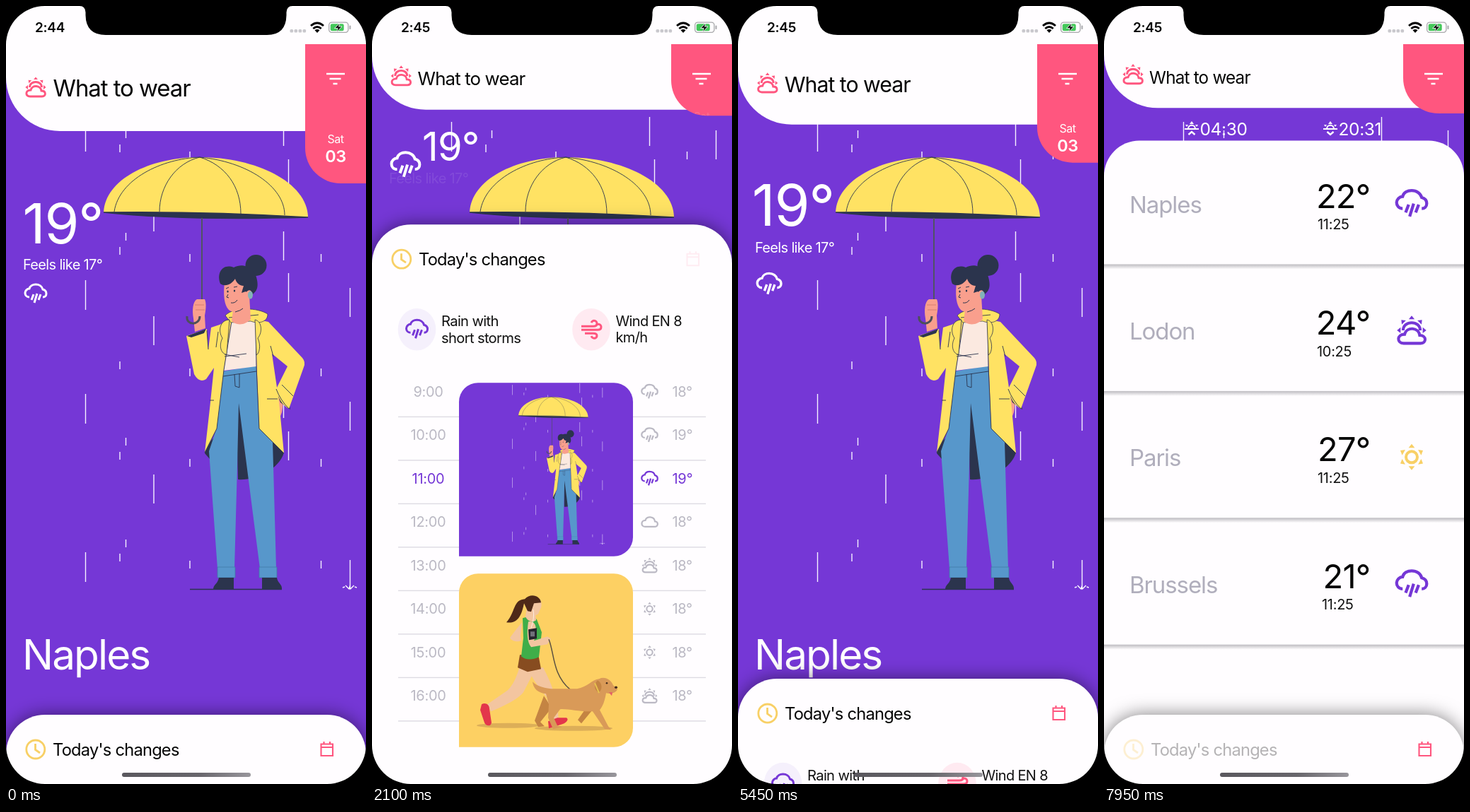
Write an HTML page with a canvas that moves like this. It is 509x1101 px and loops after 8 s.

```html
<!DOCTYPE html>
<html lang="en">
<head>
<meta charset="utf-8">
<title>What to wear</title>
<style>
html, body { margin: 0; width: 100%; height: 100%; overflow: hidden; background: #000; }
canvas { display: block; width: 509px; height: 1101px; }
</style>
</head>
<body>
<canvas id="stage" width="509" height="1101"></canvas>
<script>
const W = 509, H = 1101, LOOP = 8000;
const WHITE = '#fffdff', PURPLE = '#7537d6', PINK = '#ff567f', NAVY = '#2b344d',
  YELLOW = '#ffe263', GOLD = '#fdd063', JEANS = '#5797cb', SKIN = '#f99f8d', GREY = '#bbb9c4';
const ctx = document.getElementById('stage').getContext('2d');

// ---------- helpers ----------
const clamp = v => Math.max(0, Math.min(1, v));
const mix = (a, b, k) => a + (b - a) * k;
const ramp = (t, from, length) => clamp((t - from) / length);

// critically damped, settling fully at the end
function spring(t, start, speed) {
  const x = Math.max(0, t - start) / 1000 * speed;
  return Math.min(1, 1.003 * (1 - (1 + x) * Math.exp(-x)));
}
function bounce(t, start) {
  const s = Math.max(0, t - start) / 1000;
  return 1 - Math.exp(-9.4 * s) * (Math.cos(10.5 * s) + 0.9 * Math.sin(10.5 * s));
}
const openClose = (t, open, openSpeed, close, closeSpeed) =>
  t < 5100 ? spring(t, open, openSpeed) : 1 - spring(t, close, closeSpeed);

const paths = new Map();
function shape(d, fill, stroke, width = 1) {
  if (!paths.has(d)) paths.set(d, new Path2D(d));
  const p = paths.get(d);
  if (fill) { ctx.fillStyle = fill; ctx.fill(p); }
  if (stroke) { ctx.strokeStyle = stroke; ctx.lineWidth = width; ctx.stroke(p); }
}
function box(x, y, w, h, r, fill) {
  ctx.beginPath();
  ctx.roundRect(x, y, w, h, r);
  ctx.fillStyle = fill;
  ctx.fill();
}
function oval(x, y, rx, ry, fill) {
  ctx.beginPath();
  ctx.ellipse(x, y, rx, ry, 0, 0, 7);
  ctx.fillStyle = fill;
  ctx.fill();
}
// cy is the middle of the capitals; figures are set a little looser than words
function text(str, x, cy, size, color, weight = 400, align = 'left') {
  const tracking = /^[\d:°]+$/.test(str) ? -0.015 : -0.033;
  ctx.font = `${weight} ${size}px Inter, Roboto, sans-serif`;
  ctx.letterSpacing = `${tracking * size}px`;
  ctx.textAlign = align;
  ctx.fillStyle = color;
  ctx.fillText(str, x, cy + 0.364 * size);
}
function group(fn, x = 0, y = 0, scale = 1, alpha = 1) {
  ctx.save();
  ctx.translate(x, y);
  ctx.scale(scale, scale);
  ctx.globalAlpha *= alpha;
  fn();
  ctx.restore();
}

// ---------- icons ----------
function rays(count, from, step, radius, size, color) {
  for (let i = 0; i < count; i++) {
    ctx.save();
    ctx.rotate(from + i * step);
    ctx.translate(radius, 0);
    ctx.scale(size, size);
    shape('M0-4L5 0L0 4Z', color);
    ctx.restore();
  }
}
const icons = {
  rain(c) {
    shape('M-9 5C-13 5-15 2-15-1C-15-4-12-7-9-7C-8-11-4-13 0-13C5-13 9-10 10-6C14-5 15-2 15 0C15 3 13 5 10 5', null, c, 3);
    shape('M-3 1L-6 9M2 0L-2 13M7 1L4 9', null, c, 3);
  },
  cloud(c) {
    shape('M-8 9H9C17 9 17-1 10-1C9-11-6-12-8-3C-17-3-17 9-8 9Z', null, c, 3);
  },
  partly(c) {
    shape('M-8 13H9C15 13 15 5 8 5C7-3-5-4-7 4C-15 4-15 13-8 13ZM-8.5 0C-8.5-10 8.5-10 8.5 0', null, c, 2.9);
    rays(5, -Math.PI, Math.PI / 4, 11, 0.72, c);
  },
  sun(c) {
    shape('M-8 0A8 8 0 1 1 8 0A8 8 0 1 1-8 0', null, c, 4);
    rays(6, -Math.PI / 2, Math.PI / 3, 13, 1.1, c);
  },
  wind(c) {
    shape('M-14-4H3C10-4 9-12 4-12C2-12 1-11 0-9M-14 1H9C16 1 15-7 10-7C8-7 8-6 7-5M-9 6H3C10 6 9 13 4 13C2 13 1 12 0 10', null, c, 3);
  },
  horizon(c) {
    shape('M-10 0H10M-5 0C-5-7 5-7 5 0', null, c, 2);
    shape('M-3-7L0-11L3-7ZM-9-6L-5-6L-7-3ZM9-6L5-6L7-3Z', c);
  },
  sunrise(c) {
    icons.horizon(c);
    shape('M-4.5 8L0 4L4.5 8', null, c, 2.4);
  },
  sunset(c) {
    icons.horizon(c);
    shape('M-4.5 4L0 8L4.5 4', null, c, 2.4);
  }
};
const icon = (name, x, y, scale, color) => group(() => icons[name](color), x, y, scale);

// ---------- rainy scene ----------
function rain() {
  const drops = (x, length, ...tops) => tops.forEach(y => {
    ctx.fillStyle = '#f6f1ff';
    ctx.fillRect(x - 0.7, y, 1.4, length);
  });
  drops(112.5, 42, 164, 388, 549, 773);
  drops(209, 41, 278, 439, 663);
  drops(392.5, 41, 157, 319, 542);
  drops(399.5, 41, 217, 378, 602);
  drops(486.5, 41, 176, 399, 560, 784);
  drops(169.5, 11, 176, 321, 611, 755);
  drops(161, 11, 196, 341, 503, 631, 775);
  drops(260, 11, 206, 351, 513, 641, 785);
  drops(445.5, 11, 206, 351, 513, 641, 785);
  shape('M480 820L485 825L486 822L487 825L492 820M476 823L479 822M493 822L496 823', null, '#fff', 1.4);
}

function umbrella() {
  shape('M138 292C140 246 202 214 274 214C353 214 426 249 427 299Z', YELLOW);
  shape('M138 292Q280 290 427 299Q250 304 138 292Z', NAVY, NAVY, 1.5);
  shape('M274 214C220 216 160 245 153 291M274 214C240 222 217 255 217 291M274 214C310 225 332 255 332 294M274 214C340 220 394 255 394 296', null, NAVY, 0.9);
  shape('M277 300V439', null, '#505364', 2);
}

function legs() {
  shape('M325 555L328 670C352 672 386 656 393 632L358 590ZM283 622L281 633L288 641L295 610Z', NAVY);
  shape('M307 517L354 509L358 598L377 616L382 796H359L329 562L327 650L323 796H299L287 630L298 597Z', JEANS);
  shape('M299 794H324V809H299ZM358 794H383V809H358Z', JEANS, '#3f79a8', 0.8);
  shape('M307 524L354 517M323 521L324 538L330 540L330 520', null, NAVY, 0.9);
  shape('M301 809H322V826H293C293 818 299 819 301 809ZM362 809H383C384 817 391 818 390 826H362Z', NAVY);
  shape('M260 825.5H390', null, NAVY, 1.6);
}

function coat() {
  shape('M319 444H353L354 510L308 516Z', '#fbe9e0');
  shape('M382 542C390 543 394 556 390 575L385 588C383 578 385 562 381 552Z', SKIN);
  shape('M382 545L397 548L402 571L388 561Z', NAVY);
  shape('M319 443L302 451L290 455L286 486L284 457L255 467L266 521Q273 534 283 528L294 512L288 570L281 632L298 598L308 515Z', YELLOW);
  shape('M352 443L371 447L419 498Q424 504 421 511L400 570Q386 562 382 542L398 510L376 492L386 560L393 633L358 598Z', YELLOW);
  shape('M319 446L308 515L298 598L281 632M353 447L354 510L358 598L393 633M374 481L378 496M300 461L297 483M286 486L284 459M382 542Q388 558 400 570M390 536L406 552M369 556H384M288 558H294M309 493L330 497M309 496L340 492', null, NAVY, 0.9);
  shape('M256 467L283 457L280 463L262 469Z', NAVY);
  shape('M310 438C322 425 357 427 370 436C370 448 356 450 346 446L318 448Z', YELLOW, NAVY, 0.7);
  shape('M316 444C303 444 299 459 306 470C300 482 305 493 312 493ZM352 444C362 446 363 462 356 470C361 481 358 492 354 494Z', YELLOW, NAVY, 0.8);
  shape('M315 441L357 437', null, NAVY, 0.9);
}

function head() {
  shape('M322 425L344 409L346 443C338 453 323 452 319 445Z', SKIN);
  shape('M310 386C307 402 307 422 315 430C325 438 339 426 345 412L342 384Z', SKIN);
  oval(353.5, 367, 15, 15, NAVY);
  shape('M303 393C297 377 307 364 322 370C338 362 353 373 355 388C358 404 350 405 346 412L339 404L333 406L336 396C329 396 325 390 324 386C319 394 310 398 303 393Z', NAVY);
  shape('M339 406C344 398 351 404 345 413L341 414Z', SKIN);
  oval(345.5, 409, 3.5, 5.5, '#83b2b8');
  shape('M311 400L315 398M322 398L327 397M314 408L312 412L315 413M318 420Q324 421 327 416M324 433Q332 431 335 428', null, NAVY, 1);
  oval(313.5, 404, 1.2, 1.6, NAVY);
  oval(323, 403, 1.2, 1.6, NAVY);
}

function rainyScene() {
  rain();
  umbrella();
  legs();
  coat();
  shape('M267 461L265 442C263 431 264 418 270 415L281 415C284 421 282 433 281 438L282 456Z', SKIN);
  shape('M256 439C254 452 274 453 274 439', null, '#4d5059', 3);
  shape('M267 423H280M268 430H281', null, '#cd7769', 0.8);
  head();
}

// ---------- runner scene ----------
function runner() {
  const skin = '#f3c5a0', brown = '#4e2918', red = '#e3364b';
  oval(193, 972, 45, 3.5, '#dcae58');
  oval(285, 976, 55, 3.5, '#dcae58');
  shape('M209 888C205 902 200 914 192 922L163 942L168 952C188 944 207 934 214 925L229 896Z', skin);
  shape('M220 890C228 910 240 922 247 932L256 966L264 963C262 940 258 920 242 890Z', skin);
  shape('M155 942C160 939 166 942 166 948L169 968C168 974 161 973 159 968L153 950ZM249 966L262 961L275 961C279 963 275 969 266 971L250 976Z', red);
  shape('M212 826C206 833 200 841 195 848C198 853 205 854 211 852L210 845Z', skin);
  shape('M209 872L235 871L239 892L220 896L206 890Z', '#874c20');
  shape('M213 820C221 817 230 817 233 822L240 840L236 875C226 880 216 879 211 874L214 848Z', '#3fae49');
  shape('M219 806L231 811L232 823C226 827 220 824 217 818Z', skin);
  shape('M222 790C235 786 242 796 239 805L235 814C229 819 220 814 220 806Z', skin);
  shape('M239 798C238 788 224 784 216 793C199 794 203 812 190 826C207 829 212 814 215 799L220 810L225 811L229 799Z', brown);
  shape('M221 825C230 823 234 831 231 846L229 852L248 846L253 849L248 857L225 861C219 854 219 840 221 825Z', skin);
  shape('M221 836L233 834L233 849L222 851Z', '#25252c');
  shape('M224 839H230V846H224Z', '#71717a');
  shape('M228 808Q230 820 225 834', null, '#fff', 0.7);
  shape('M250 850C258 870 255 900 280 921', null, '#5b5141', 1.5);
  dog();
}
function dog() {
  const coatColor = '#d99a58', shade = '#c48443';
  shape('M243 930L230 965L235 974L244 973L238 967L254 947ZM307 941L291 964L296 969L310 952Z', shade);
  shape('M246 927C235 926 228 920 227 910C234 917 245 919 253 920L290 920C304 918 311 907 321 906C329 902 338 907 341 915L347 920C346 926 337 928 331 926C329 938 326 945 322 950L334 973L338 978L329 977L312 952C294 953 277 948 266 949L257 961L262 972L269 974L256 977L249 961L250 942Z', coatColor);
  shape('M319 908C313 914 314 923 321 925C326 921 326 912 319 908Z', shade);
  shape('M315 912L321 926', null, '#e8c24f', 2);
  oval(332, 912, 1.3, 1.3, '#41291b');
  oval(345, 918, 2, 1.7, '#41291b');
  shape('M335 925L340 925L339 930Z', '#e35d66');
}

// ---------- panels ----------
function card(y, fill, draw) {
  ctx.save();
  ctx.beginPath();
  ctx.roundRect(123, y, 246, 245.5, [27, 27, 27, 0]);
  ctx.fillStyle = fill;
  ctx.fill();
  ctx.clip();
  draw();
  ctx.restore();
}

function sheet(top, calendarAlpha, titleAlpha) {
  ctx.save();
  ctx.translate(0, top - 263);
  ctx.shadowColor = 'rgba(0,0,0,.5)';
  ctx.shadowBlur = 26;
  box(0, 263, W, 900, [55, 55, 0, 0], WHITE);
  ctx.shadowColor = 'transparent';

  group(() => {
    shape('M28.8 312A13 13 0 1 1 54.8 312A13 13 0 1 1 28.8 312M41.5 304V312.5L48 317', null, '#f8d066', 2.8);
    text("Today's changes", 66, 312.5, 23.7, '#050505');
  }, 0, 0, 1, titleAlpha);
  group(() => {
    shape('M445.5 304.5H462V321H445.5ZM445.5 309H462M449.5 301V305M458 301V305', null, PINK, 2.1);
  }, 0, 0, 1, calendarAlpha);

  oval(63.5, 411.5, 26.8, 29.7, '#f5f0fc');
  icon('rain', 63.5, 411, 1, PURPLE);
  text('Rain with', 98, 399.5, 20.2, '#111');
  text('short storms', 98, 423, 20.2, '#111');
  oval(310, 411.5, 26.8, 29.7, '#ffeaf1');
  icon('wind', 310, 411, 1, PINK);
  text('Wind EN 8', 344.5, 399.5, 20, '#111');
  text('km/h', 344.5, 423, 20, '#111');

  const kinds = ['rain', 'rain', 'rain', 'cloud', 'partly', 'sun', 'sun', 'partly'];
  kinds.forEach((kind, i) => {
    const y = 499.5 + 61.5 * i, color = i === 2 ? PURPLE : GREY;
    ctx.fillStyle = '#dddbe3';
    ctx.fillRect(37, y + 35, 435, 1.4);
    text(`${9 + i}:00`, 79.5, y, 20, color, 400, 'center');
    icon(kind, 392.5, y, kind === 'sun' ? 0.52 : 0.75, color);
    text(i === 1 || i === 2 ? '19°' : '18°', 424.5, y, 20, color);
  });

  card(487, PURPLE, () => group(rainyScene, 160, 434, 0.341));
  card(757, GOLD, runner);
  ctx.restore();
}

function cityList(top) {
  group(() => {
    box(0, 191, W, 1000, [50, 50, 0, 0], WHITE);
    const rows = [
      ['Naples', '22°', '11:25', 'rain', 302], ['Lodon', '24°', '10:25', 'partly', 301],
      ['Paris', '27°', '11:25', 'sun', 302], ['Brussels', '21°', '11:25', 'rain', 308]
    ];
    rows.forEach(([city, degrees, time, kind, x], i) => {
      const y = 281 + 179.4 * i, edge = y + 85;
      const shade = ctx.createLinearGradient(0, edge, 0, edge + 7);
      shade.addColorStop(0, '#bdbbc0');
      shade.addColorStop(1, WHITE);
      ctx.fillStyle = shade;
      ctx.fillRect(0, edge, W, 7);
      text(city, 36, y, 33, '#b0aebc');
      text(degrees, 376.5, y - 12, 47, '#050505', 400, 'right');
      text(time, x, y + 28.5, 20, '#111');
      icon(kind, 435, y - 1, kind === 'sun' ? 1 : 1.42, kind === 'sun' ? '#f8d066' : PURPLE);
    });
  }, 0, top - 191);
}

function statusBar(t) {
  text(t < 500 ? '2:44' : '2:45', 41, 30.5, 19, '#050505', 600);
  for (let i = 0; i < 4; i++) box(401.5 + 6 * i, 33, 4.6, 4.6, 1.5, '#c9c8cd');
  shape('M431 28Q440 20 449 28M434.3 32Q440 27 445.7 32', null, '#050505', 2.8);
  shape('M436.5 34.3Q440 31.5 443.5 34.3L440 38Z', '#050505');
  box(456, 22.5, 28.5, 15.5, 4.5, '#a8a8ab');
  box(457.3, 23.8, 25.9, 12.9, 3.4, WHITE);
  box(458.7, 25.2, 19, 10.1, 2.4, '#43c759');
  box(485.5, 27.5, 2, 5.5, 1, '#a8a8ab');
  shape('M472 24L464.5 31.5H469L467.5 37L475 29H470.5Z', '#111', WHITE, 0.8);
}

function deviceFrame() {
  const bar = ctx.createLinearGradient(164, 0, 346, 0);
  bar.addColorStop(0, '#5a585e');
  bar.addColorStop(0.6, '#68666c');
  bar.addColorStop(1, '#98969c');
  box(164, 1085, 182, 6, 3, bar);
  ctx.beginPath();
  ctx.rect(0, 0, W, H);
  ctx.roundRect(0, 0, W, H, 55);
  ctx.fillStyle = '#000';
  ctx.fill('evenodd');
  shape('M104 0Q112 0 112.5 9V13Q113 41 141 41H369Q396 41 396.5 13V9Q397 0 405 0Z', '#000');
}

// ---------- picture at time t ----------
function draw(t) {
  const list = spring(t, 7510, 14.3);
  const up = openClose(t, 1659, 10, 5150, 14.3);
  const fold = Math.max(openClose(t, 1660, 12.5, 5230, 11), list);
  const shrink = Math.max(openClose(t, 1864, 12, 5230, 11), spring(t, 7560, 12));
  const fade = t < 5100 ? 1 - ramp(t, 1650, 500) : ramp(t, 5100, 350);

  ctx.fillStyle = PURPLE;
  ctx.fillRect(0, 0, W, H);
  rainyScene();

  // current weather
  const tempY = openClose(t, 1660, 10, 5200, 11.4);
  const tempSize = t < 5100 ? spring(t, 1864, 12) : 1 - bounce(t, 5150);
  const feelsY = openClose(t, 1700, 10, 5190, 12);
  const iconY = openClose(t, 1760, 10, 5150, 14.5);
  const iconSize = openClose(t, 1864, 12, 5230, 11);
  group(() => {
    text('19°', mix(23.5, 84.5, tempSize), mix(307, 191, tempY), mix(79, 49.5, tempSize), '#fff');
    group(() => text('Feels like 17°', 24, mix(366, 232, feelsY), 20, '#fff'), 0, 0, 1, fade);
    icon('rain', mix(42, 49, iconSize), mix(407, 194, iconY), mix(1, 1.42, iconSize), '#fff');
  }, 0, 0, 1, 1 - ramp(t, 7500, 200));
  text('Naples', 23, 917.5, 58.5, '#fff');

  if (t >= 7510) {
    group(() => {
      icon('sunrise', 124, 174, 1, '#fff');
      text('04:30', 135.5, 174, 24.5, '#fff');
      icon('sunset', 320, 174, 1, '#fff');
      text('20:31', 331.5, 174, 24.5, '#fff');
    }, 0, 0, 1, ramp(t, 7650, 250));
    cityList(mix(1003, 182, list));
  }

  const calendarAlpha = t < 7400 ? fade : mix(0.2, 1, ramp(t, 7500, 400));
  sheet(mix(1003, 263, up), calendarAlpha, 1 - ramp(t, 7500, 640));

  // header
  box(0, -20, W, 197 - 31 * fold - 2 * list, [0, 0, 0, 76], WHITE);
  const titleY = 116 - 13 * Math.min(1, 1.25 * fold) - 1.5 * list;
  icon('partly', mix(42, 41, shrink), titleY - 1 - 4 * shrink, 1, PINK);
  text('What to wear', mix(66.5, 64, shrink), titleY, mix(33, 23.8, shrink), '#050505');

  // date tab
  ctx.save();
  ctx.beginPath();
  ctx.roundRect(423, 54, 90, 197 - 98 * fold - 2 * list, [0, 0, 0, 50]);
  ctx.fillStyle = PINK;
  ctx.fill();
  ctx.clip();
  shape('M453 96H479M457.5 103H473.5M462.5 110H468.5', null, '#fff', 2.6);
  ctx.globalAlpha = clamp((1 - fold) * 6);
  const dayY = 188 - 32 * Math.pow(fold, 0.65);
  text('Sat', 466, dayY, 16, '#fff', 400, 'center');
  text('03', 466, dayY + 24, 23.5, '#fff', 600, 'center');
  ctx.restore();

  statusBar(t);
  deviceFrame();
}

const start = performance.now();
function tick() {
  draw((performance.now() - start) % LOOP);
  requestAnimationFrame(tick);
}
tick();
</script>
</body>
</html>
```
